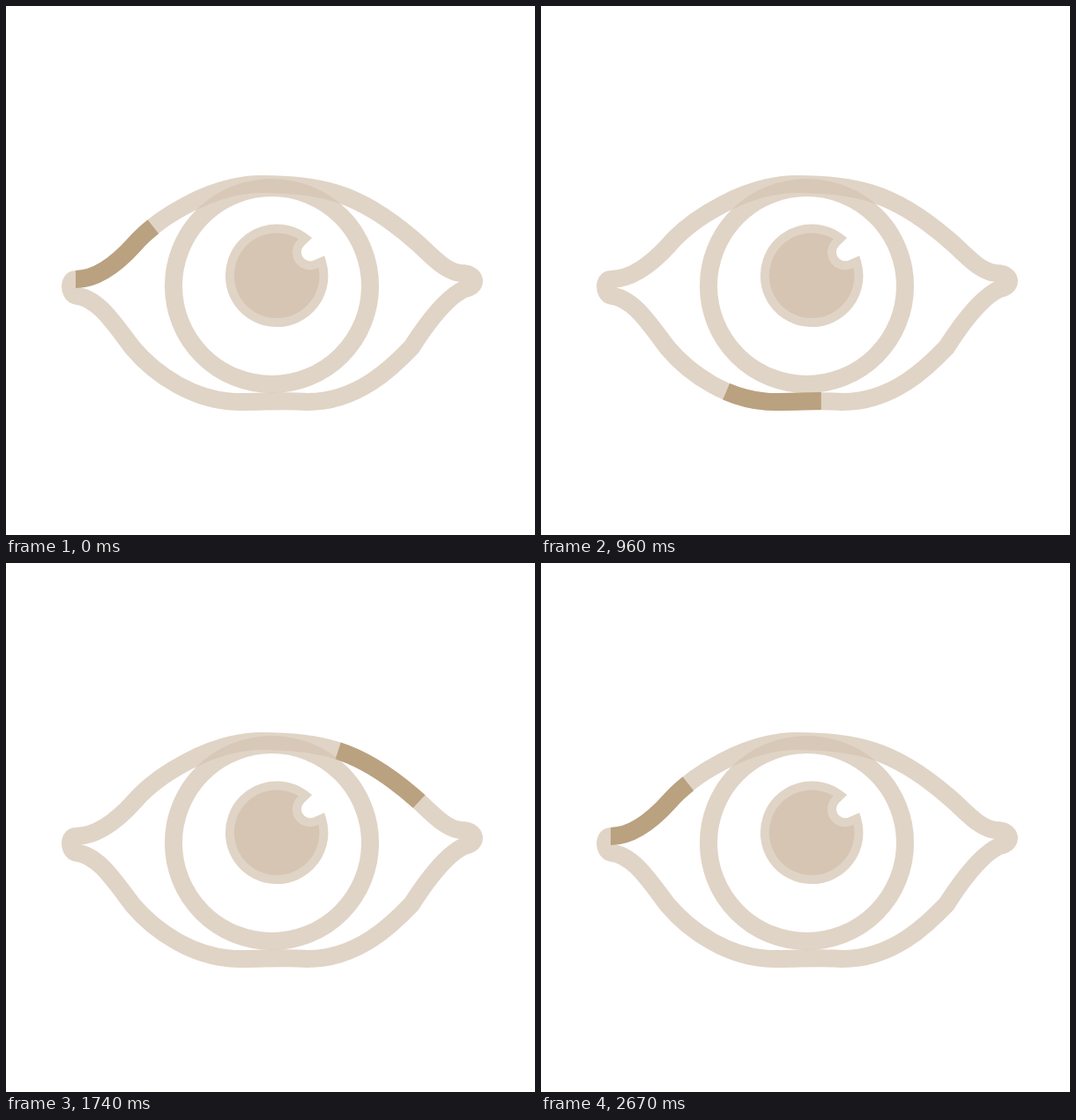
An HTML page that plays this animation: 600x600 px, repeating every 2700 ms.

```html
<!DOCTYPE html>
<html lang="en">
<head>
<meta charset="utf-8">
<title>Eye</title>
<style>
  html, body { margin: 0; width: 100%; height: 100%; overflow: hidden; background: #fff; }
  svg { display: block; width: 100vw; height: 100vh; }
  .lid, .iris { fill: none; stroke-width: 20; stroke-miterlimit: 10; }
</style>
</head>
<body>
<svg viewBox="0 0 600 600">
  <defs>
    <path id="lid" pathLength="1000" d="M79 310
      C104 310 128 290 146 270
      C170 242 232 202 290 202
      C320 202 348 204 375 212.5
      C409 223 440 245 468 270
      C482 283 499 302 516 303
      C534 303 536 318 520 321
      C498 331 476 362 460 387
      C440 408 400 449 342 449
      C318 447 295 449 265 449
      C214 449 169 418 143 387
      C122 359 104 331 79 328.5
      C71 326 71 310 79 310Z"/>
    <circle id="iris" cx="301.5" cy="317.5" r="111.5"/>
  </defs>
  <use href="#lid" class="lid" stroke="#e0d4c6"/>
  <use href="#iris" class="iris" stroke="#d3c2af" stroke-opacity=".71"/>
  <use href="#lid" class="lid" id="runner" stroke="#baa180"/>
  <use href="#iris" class="iris" stroke="#e0d4c6" stroke-opacity=".1"/>
  <path fill="#d5c5b2" stroke="#e0d4c6" stroke-width="10" stroke-miterlimit="10"
    d="M339.5 263.5A53.3 53.3 0 1 0 358 290L351 293A15 15 0 0 1 334.5 268.5Z"/>
</svg>
<script>
  const LOOP = 2700, STEP = 30, LAPS = 2, DASH = 100, LENGTH = 1000;
  const runner = document.getElementById('runner');
  runner.style.strokeDasharray = `${DASH} ${LENGTH - DASH}`;

  // The last step of the loop lands exactly on the starting pose.
  function draw(ms) {
    const step = Math.floor((ms % LOOP) / STEP + 0.001);
    const turns = LAPS * step / (LOOP / STEP - 1);
    runner.style.strokeDashoffset = -(turns % 1) * LENGTH;
  }

  const start = performance.now();
  function tick() {
    draw(performance.now() - start);
    requestAnimationFrame(tick);
  }
  tick();
</script>
</body>
</html>
```
